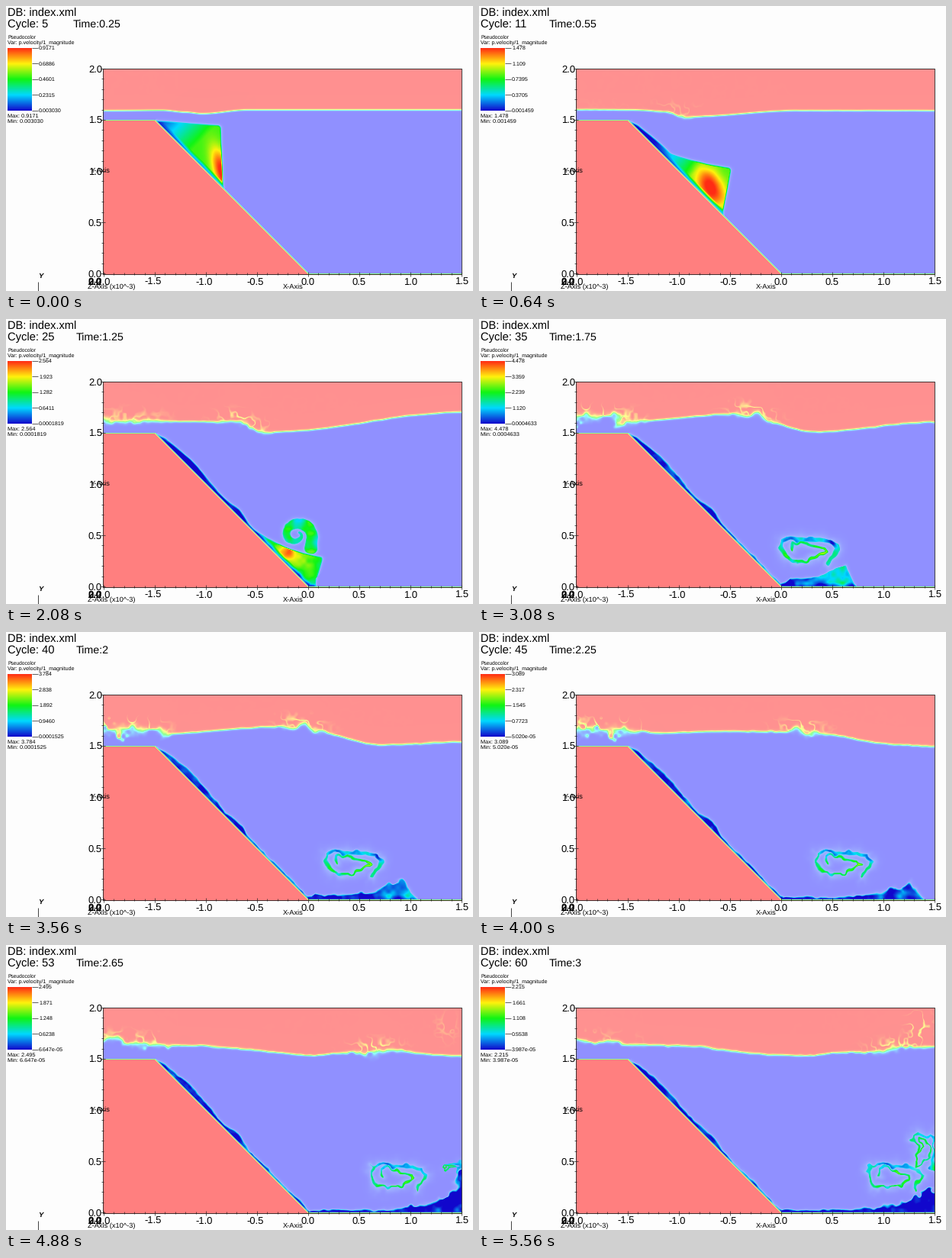
A matplotlib script that plays this animation: 612 px wide and 373 px high, repeating every 5600 ms.

```python
import numpy as np
import matplotlib.pyplot as plt
from matplotlib.animation import FuncAnimation

STAGE_W, STAGE_H, DPI = 612, 373, 100
LEFT, TOP, W, H = 127, 82, 470, 270
RIGHT = LEFT + W
UNIT = 134  # pixels per axis unit
FIRST = 5   # first cycle shown

# Legend limits at a few cycles.
KEYS = [5, 17, 25, 35, 45, 53, 60]
V_MAX = [0.9171, 2.038, 2.564, 4.478, 3.089, 2.495, 2.215]
V_MIN = [3.030e-3, 7.025e-4, 1.819e-4, 4.633e-4, 5.020e-5, 6.647e-5, 3.987e-5]

# Bed: flat shelf, 45 degree slope, flat floor.
SHELF_X, SHELF_Y, TOE_X, FLOOR_Y = 196, 149.5, 396, 350.5
ROOT2 = np.sqrt(2)
TOE = (TOE_X - SHELF_X) * ROOT2  # slope length

STOPS = np.linspace(0, 1, 5)
RAMP = np.linspace(0, 1, 256)


def lut(colors):
    return np.stack([np.interp(RAMP, STOPS, ch) for ch in zip(*colors)], axis=1)


PURE = lut([(0, 0, 1), (0, 1, 1), (0, 1, 0), (1, 1, 0), (1, 0, 0)])
HOT = lut([(.07, .03, .8), (0, .85, 1), (.06, .96, .08), (1, .95, .05), (1, .17, .08)])
HALO = np.array([.7, .9, 1])

rng = np.random.default_rng(7)
xs = LEFT + .5 + np.arange(W)
X, Y = np.meshgrid(xs, TOP + .5 + np.arange(H))


def ease(t):
    t = np.clip(t, 0, 1)
    return t * t * (3 - 2 * t)


def bump(x, mid, width):
    return np.exp(-((x - mid) / width) ** 2)


def tile(step, width):
    g = rng.normal(size=(H // step + 2, width // step + 2))
    p, q = np.arange(H) / step, np.arange(width) / step
    i, j = p.astype(int), q.astype(int)
    fy, fx = ease(p - i)[:, None], ease(q - j)
    rows = g[i] * (1 - fy) + g[i + 1] * fy
    return rows[:, j] * (1 - fx) + rows[:, j + 1] * fx


NOISE = [tile(14, 2 * W) + .5 * tile(6, 2 * W) for _ in range(3)]


def shade(table, v):
    return table[(np.clip(v, 0, 1) * 255).astype(int)]


def bed_coords(x, y):
    """Distance travelled along the bed and height above it."""
    foot, u, z = (x + y + 46) / 2, x - TOE_X, FLOOR_Y - y
    lean = np.exp(-np.maximum(u, 0) / 60)
    on_slope = foot < TOE_X
    s = np.where(on_slope, (foot - SHELF_X) * ROOT2, TOE + u - z * lean)
    d = np.where(on_slope, (x - y - 46) / ROOT2, z * (1 + .41 * lean))
    return s, d


# Distance to the solid, positive in the fluid.
BANK = np.maximum(SHELF_Y - Y, np.minimum((X - Y - 46) / ROOT2, FLOOR_Y - Y))
FLUID = np.clip(BANK - .3, 0, 1)


def paint(rgb, sd, v, glow=.6, soft=1.3):
    halo = (glow * np.exp(-np.maximum(sd, 0) / soft) * FLUID)[..., None]
    rgb = rgb + (HALO - rgb) * halo
    cover = (np.clip(.5 - sd, 0, 1) * FLUID)[..., None]
    return rgb + (shade(HOT, v) - rgb) * cover


def surface(k):
    """Water line and the place of the breaking crest."""
    crest = 235 + 1.6 * k + .068 * k * k
    trough = min(crest + 22 + .08 * k * k, RIGHT)
    far = min(trough + 60 + 14 * k, RIGHT + 1)
    swing = 14 * min(1, k / 18) * np.cos((k - 19) * 2 * np.pi / 46)
    far_y = 136 - swing
    trough_y = 141 + 7 * min(1, k / 10) if trough < RIGHT else far_y
    crest_y = 139 - 16 * bump(k, 33, 12)
    knots = [(LEFT, 137 - .2 * k), (205, 136.5 - .1 * k), (crest, crest_y),
             (trough, trough_y), (far, far_y), (RIGHT + 2, far_y)]
    ys = np.full(W, float(far_y))
    for (x0, y0), (x1, y1) in zip(knots, knots[1:]):
        t = (xs - x0) / max(x1 - x0, 1)
        ys = np.where((t >= 0) & (t < 1), y0 + (y1 - y0) * ease(t), ys)
    ys += 9 * ease((k - 36) / 12) * bump(xs, 395, 80)
    ys += 10 * bump(k, 12, 3) * bump(xs, 212, 7)
    return ys, crest


def background(k, n, fine):
    ys, crest = surface(k)
    inflow = np.clip((225 - xs) / 45, 0, 1) * bump(k, 36, 16)
    breaker = bump(xs, crest + 15, 28) * min(1, k / 20)
    rough = 6 * inflow + 3.5 * breaker + k / 70
    air = .5 + .5 * np.tanh((ys + .8 * rough * (n - .2) - Y) / (1.1 + .4 * rough))

    # Spray threads above the rough water.
    thread = np.clip(1 - 2.5 * np.abs(fine), 0, 1)
    spray = (.4 * inflow + .3 * breaker) * bump(Y, ys - 6, 9)
    plume = .34 * ease((k - 44) / 11) * bump(X, 577, 13) * bump(Y, 108, 16)
    air = air - air * thread * (spray + plume)

    bank = np.clip(.5 - BANK / 2, 0, 1)
    white = (.565 - .065 * bank)[..., None]
    return shade(PURE, np.maximum(air, bank)) * (1 - white) + white


def thickness(s, k, front):
    """Slide height along the bed: wake sheet, head and the pile at the wall."""
    sheet = 2.5 + 6 * bump(s, 60, 45) + 5 * bump(s, 148, 16)
    sheet += np.where(s > TOE, 2 + 10 * bump(k, 30, 6) + 7 * np.clip((s - 370) / 80, 0, 1), 0)
    sheet *= np.clip(s / 12, 0, 1) * np.clip((front - s) / 30, 0, 1)

    peak = front - 20 - 41 * np.exp(-k / 6)
    tail = 65 + 55 * min(1, k / 12)
    rise = np.clip((s - peak + tail) / tail, 0, 1) ** (1 + k / 20)
    fall = np.clip((front - s) / (front - peak), 0, 1)
    head = (56 - .75 * k) * np.minimum(rise, fall)

    late = max(k - 47, 0)
    wall = TOE + RIGHT - TOE_X
    pile = ease((k - 43) / 5) * (60 - 4 * late) * np.exp((s - wall) / (15 + 6 * late))
    h = np.maximum(np.maximum(sheet, head), pile)
    return np.convolve(np.pad(h, 3, "edge"), np.ones(7) / 7, "valid")


def slide(rgb, k, x, y, n, fine):
    front = 126 + 8 * k + .015 * k * k
    s, d = bed_coords(x, y)
    line_s = np.arange(-20, 520.)
    h = thickness(line_s, k, front)
    steep = np.sqrt(1 + np.gradient(h) ** 2)
    h = np.interp(s, line_s, h) * (1 + .22 * ease((k - 25) / 15) * n * (s > TOE))
    sd = np.where(h > .4, (d - h) / np.interp(s, line_s, steep), 99)

    base = np.interp(k, [15, 45], [.55, .08])
    start = front - 130 + 2.5 * max(k - 18, 0)
    v = base * np.clip((s - start) / 65, 0, 1)
    slant = (d - 14) * 1.2 * np.exp(-k / 6)
    hot = bump(s + slant, front - 16 - 3.4 * k, 20 + 1.2 * k) * bump(d, 14, 18)
    v = v + .5 * (1 - ease((k - 19) / 8)) * hot * np.clip((s - start) / 65, 0, 1)
    v = v * np.clip(d / 7 + .15, 0, 1) + .07 * ease(k / 30) * fine
    v = v + (.28 - v) * np.clip(1 + sd / 1.8, 0, 1)
    return paint(rgb, sd, v)


def ribbon(x, y, pts, r0, r1):
    """Distance to a tapered line and the position along it."""
    best, along = np.full(x.shape, 1e3), np.zeros(x.shape)
    count = len(pts) - 1
    for i, (a, b) in enumerate(zip(pts, pts[1:])):
        dx, dy = b - a
        t = ((x - a[0]) * dx + (y - a[1]) * dy) / (dx * dx + dy * dy + 1e-6)
        t = np.clip(t, 0, 1)
        q = (i + t) / count
        dist = np.hypot(x - a[0] - t * dx, y - a[1] - t * dy) - (r0 + (r1 - r0) * q)
        near = dist < best
        best, along = np.where(near, dist, best), np.where(near, q, along)
    return best, along


def spiral(cx, cy, rx, ry, turns, inner, wobble):
    q = np.linspace(0, 1, 26)
    a = -.8 + 2 * np.pi * turns * q
    r = 1.25 + (inner - 1.25) * np.sqrt(q) + wobble * np.sin(3.3 * a)
    return np.column_stack([cx + rx * r * np.cos(a), cy - ry * r * np.sin(a)])


def vortices(rgb, k, x, y, fine):
    """Sheet rolled up behind the head, later a second one climbing the wall."""
    grow, age = ease((k - 12) / 8), ease((k - 20) / 10)
    curls = []
    if grow > 0:
        cx, cy = 380 + 4.5 * (k - 20), 282 + 2.1 * np.clip(k - 20, -8, 10)
        pts = spiral(cx, cy, grow * (23 + 19 * age), grow * 20,
                     1.25 + .35 * age, .25 + .25 * age, .1 * age)
        curls.append((pts, grow * (1.8 + 6.5 * np.exp(-max(k - 20, 0) / 6)), 1.4, 1))
    climb = ease((k - 45) / 10)
    if climb > 0:
        pts = spiral(582, 300 - 32 * climb, 15, 30 * climb, 1.7, .3, .2)
        curls.append((pts, 1.4, 1.2, climb))
    for pts, r0, r1, glow in curls:
        sd, q = ribbon(x, y, pts, r0, r1)
        v = .42 - .2 * age * bump(q, .2, .15) + .12 * age * q + .1 * fine
        v = v + (.27 - v) * .6 * np.clip(1 + sd / 1.5, 0, 1)
        rgb = paint(rgb, sd, v, .5 * glow, 1.8 + 2.2 * age)
    return rgb


def field(c):
    k = c - FIRST
    shift = 330 - 5 * c
    n, m, fine = (tex[:, shift:shift + W] for tex in NOISE)
    warp = .3 + 2.4 * ease((k - 12) / 30)
    x, y = X + warp * n, Y + warp * m
    rgb = background(k, n, fine)
    rgb = vortices(rgb, k, x, y, fine)
    rgb = slide(rgb, k, X + .3 * warp * n, Y + .3 * warp * m, n, fine)
    return (np.clip(rgb, 0, 1) * 255).astype(np.uint8)


plt.rcParams["text.hinting"] = "no_hinting"
fig = plt.figure(figsize=(STAGE_W / DPI, STAGE_H / DPI), dpi=DPI, facecolor="#fdfdfd")
ax = fig.add_axes([0, 0, 1, 1])
ax.axis("off")


def text(x, y, s, px, **kw):
    return ax.text(x, y, s, fontsize=px * 72 / DPI, family="Liberation Sans", **kw)


def line(x, y, lw=.6):
    ax.plot(x, y, color="#202020", lw=lw, solid_capstyle="butt", zorder=3)


image = ax.imshow(np.zeros((H, W, 3), np.uint8), extent=(LEFT, RIGHT, TOP + H, TOP),
                  interpolation="nearest", aspect="auto")
ax.imshow(HOT[::-1, None], extent=(2, 34, 137, 55), aspect="auto")
ax.set_xlim(0, STAGE_W)
ax.set_ylim(STAGE_H, 0)

# Plot box, ticks and axis labels.
x0, x1, y0, y1 = LEFT - .5, RIGHT - .5, TOP - .5, FLOOR_Y
line([x0, x1, x1, x0, x0], [y0, y0, y1, y1, y0])
for i in range(36):
    r, x = (3 if i % 5 == 0 else 1.5), 128 + i * UNIT / 10
    line([x, x], [y1 - r, y1 + r], .5)
    if i % 5 == 0:
        text(x - (2 if i < 20 else 0), 360, f"{i / 10 - 2:.1f}", 13, ha="center", va="center_baseline")
for i in range(21):
    r, y = (3 if i % 5 == 0 else 1.5), 350 - i * UNIT / 10
    line([x0 - r, x0 + r], [y, y], .5)
    if i % 5 == 0:
        text(126, y, f"{i / 10:.1f}", 13, ha="right", va="center_baseline")
for s in ("0.0", "2.0"):
    text(117, 360, s, 13, ha="center", va="center_baseline", weight="bold")
text(363, 370, "X-Axis", 9.3)
text(111, 218, "Y-Axis", 9.3)
text(107, 370, "Z-Axis (x10^-3)", 9.3)
text(42, 356, "Y", 9.5, weight="bold", style="italic")
line([42, 42], [361, 373])

# Header and legend.
text(2, 14, "DB: index.xml", 14.6)
cycle_text = text(2, 28, "", 14.8)
time_text = text(88, 28, "", 14.2)
text(2, 43, "Pseudocolor", 6.6)
text(2, 50, "Var: p.velocity/1_magnitude", 7.2)
scale = []
for i in range(5):
    y = 136.5 - 20.5 * i
    line([34, 42], [y, y], .5)
    scale.append(text(43, y + 2.5, "", 7.2))
max_text = text(2, 146, "", 7.4)
min_text = text(2, 153, "", 7.4)

cache = {}


def draw(i):
    c = FIRST + i * 2 // 5
    if c not in cache:
        cache[c] = field(c)
    image.set_data(cache[c])
    cycle_text.set_text(f"Cycle: {c}")
    time_text.set_text(f"Time:{c / 20:g}")
    time_text.set_x(88 if c < 10 else 92)
    hi = np.interp(c, KEYS, V_MAX)
    lo = np.exp(np.interp(c, KEYS, np.log(V_MIN)))
    for j, label in enumerate(scale):
        label.set_text(f"{lo + (hi - lo) * j / 4:#.4g}")
    max_text.set_text(f"Max: {hi:#.4g}")
    min_text.set_text(f"Min: {lo:#.4g}")
    return []


anim = FuncAnimation(fig, draw, frames=140, interval=40, repeat=True, repeat_delay=0, blit=False)
plt.show()
```
